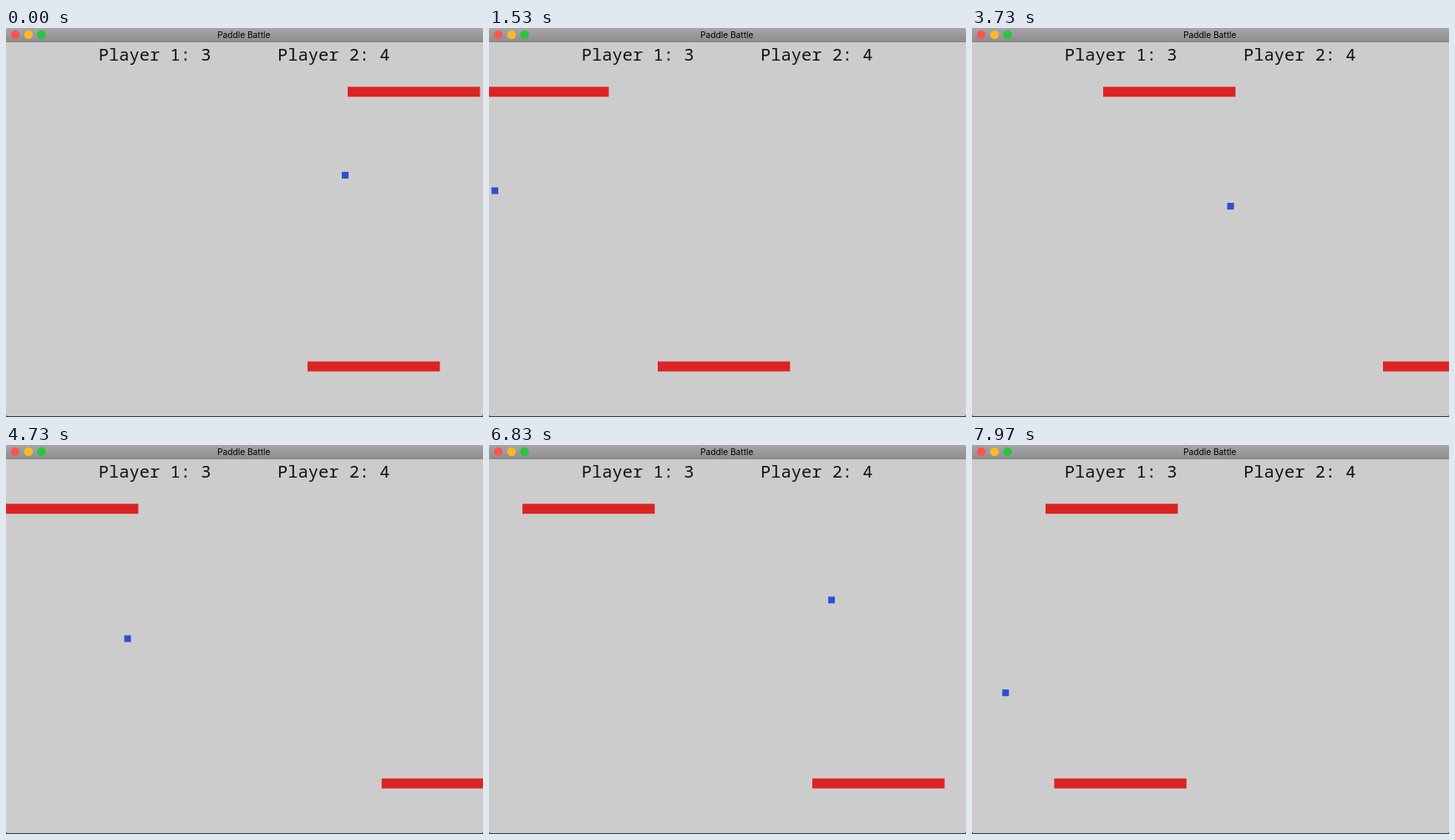
Write an HTML page that moves like this. It is 571 by 465 pixels and loops after 8 s.

```html
<!DOCTYPE html>
<html lang="en">
<head>
<meta charset="utf-8">
<title>Paddle Battle</title>
<style>
  html, body { margin: 0; width: 100%; height: 100%; overflow: hidden; background: #ccc; }
  svg { display: block; }
  .title { font: 10.2px Inter, "Open Sans", sans-serif; text-anchor: middle; }
  .score { font: 20.4px "Noto Sans Mono", "DejaVu Sans Mono", monospace; fill: #111; }
  .paddle { fill: #dc2323; }
  .ball { fill: #2b50d3; }
</style>
</head>
<body>
<svg width="571" height="465" viewBox="0 0 571 465">
  <defs>
    <linearGradient id="bar" x2="0" y2="1">
      <stop stop-color="#a6a6a8"/>
      <stop offset="1" stop-color="#8e8e90"/>
    </linearGradient>
  </defs>
  <rect width="571" height="465" fill="#2c3a48"/>
  <path d="M0 0H571V462Q571 464 569 464H2Q0 464 0 462Z" fill="#ccc"/>
  <path d="M0 16V2Q0 0 2 0H569Q571 0 571 2V16Z" fill="url(#bar)"/>
  <rect y="16" width="571" height="1" fill="#858587"/>
  <circle cx="11" cy="8" r="5.2" fill="#fc5550"/>
  <circle cx="27" cy="8" r="5.2" fill="#f9b927"/>
  <circle cx="42.5" cy="8" r="5.2" fill="#28c63c"/>
  <text class="title" x="284.7" y="12">Paddle Battle</text>
  <text class="score" x="110.8" y="38.7">Player 1: 3</text>
  <text class="score" x="325" y="38.7">Player 2: 4</text>
  <rect id="top" class="paddle" y="70.3" width="158.4" height="11.9"/>
  <rect id="bottom" class="paddle" y="398.6" width="158.4" height="11.9"/>
  <rect id="ball" class="ball" width="8" height="8"/>
</svg>
<script>
  const LOOP = 8000, STEP = 1000 / 30;
  const PADDLE_SPEED = 10.57, BALL_RISE = 9.25;
  const LEFT = -3, RIGHT = 566, LOWEST = 394;
  const CROSSING = 34, FIRST_HIT = 24;

  // Sideways speed of the ball, changed by each paddle hit.
  const sideSpeeds = [-6.2, -11.37, 11.55, 15.32, -14.91, -17.77, 19.8, -21.3];

  // Each player's moves: [step when the key goes down, x where it is let go].
  const topMoves = [[4, -15], [86, 157], [115, 0], [155, 145], [178, 40], [226, 88]];
  const bottomMoves = [[10, 202], [60, 336], [76, 362], [83, 492], [138, 387], [211, 98.4]];

  function bounce(x) {
    if (x < LEFT) return 2 * LEFT - x;
    return x > RIGHT ? 2 * RIGHT - x : x;
  }

  function ballX(step) {
    let x = 402, hit = FIRST_HIT, elapsed = 0;
    for (const speed of sideSpeeds) {
      x = bounce(x + speed * (Math.min(step, hit) - elapsed));
      if (step <= hit) break;
      elapsed = hit;
      hit += CROSSING;
    }
    return x;
  }

  function ballY(step) {
    const period = 2 * CROSSING;
    const phase = (step + period - FIRST_HIT) % period;
    return LOWEST - BALL_RISE * Math.min(phase, period - phase);
  }

  function paddleX(x, moves, step) {
    for (const [start, goal] of moves) {
      const reach = PADDLE_SPEED * Math.max(0, step - start);
      x += Math.max(-reach, Math.min(reach, goal - x));
    }
    return x;
  }

  const [topPaddle, bottomPaddle, ball] = ["top", "bottom", "ball"].map(id => document.getElementById(id));

  function draw(time) {
    const step = Math.floor((time % LOOP + 4) / STEP) % 240;
    topPaddle.setAttribute("x", paddleX(409, topMoves, step));
    bottomPaddle.setAttribute("x", paddleX(361, bottomMoves, step));
    ball.setAttribute("x", ballX(step));
    ball.setAttribute("y", ballY(step));
  }

  let start;
  function tick(now) {
    start ??= now;
    draw(now - start);
    requestAnimationFrame(tick);
  }
  draw(0);
  requestAnimationFrame(tick);
</script>
</body>
</html>
```
